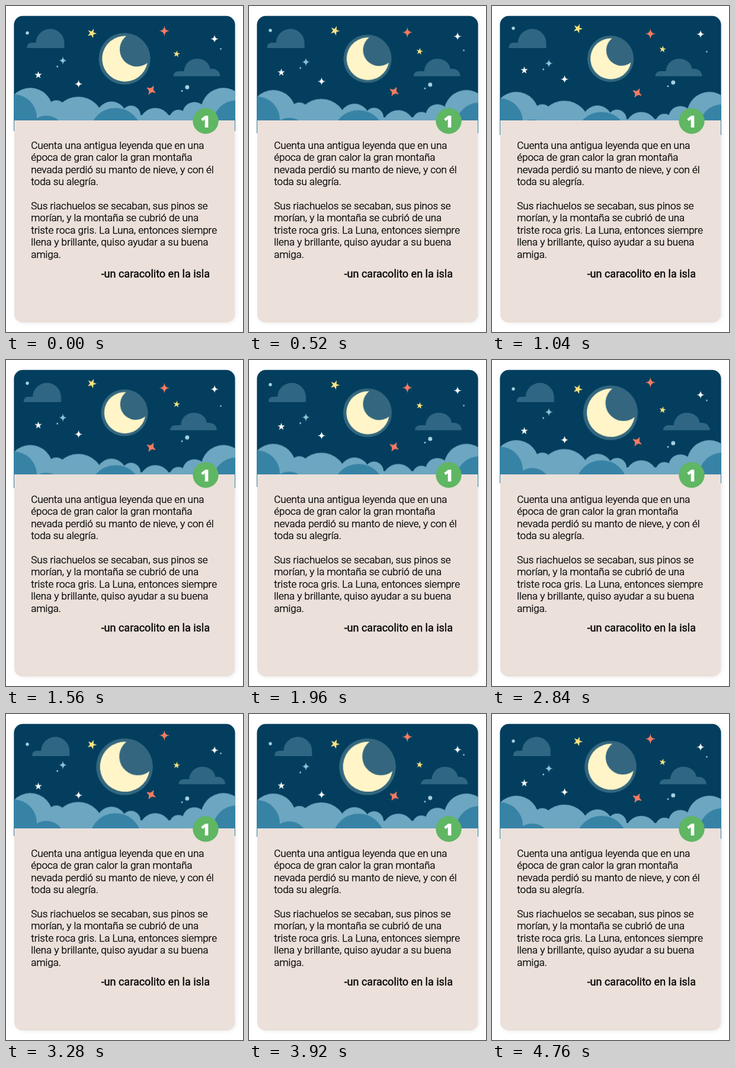
An HTML page for the animation above (4800 ms loop, 400 by 550 pixels).

```html
<!DOCTYPE html>
<html lang="es">
<head>
<meta charset="utf-8">
<title>Cuento de la luna</title>
<style>
  html, body { margin: 0; width: 100%; height: 100%; overflow: hidden; background: #fff; }
  svg { display: block; width: 400px; height: 550px; }
  .card { filter: drop-shadow(2px 1px 3px rgba(0, 0, 0, .08)); }

  .drift { animation: drift 2400ms cubic-bezier(.37, 0, .63, 1) -1300ms infinite alternate; }
  .pulse {
    animation: pulse 2400ms cubic-bezier(.37, 0, .63, 1) -1200ms infinite alternate;
    transform-origin: 200px 89px;
  }
  /* --u sets the size and direction of the bob. */
  .rise, .swell { animation: rise 4800ms linear infinite; }
  .rise { --u: 1px; }
  .swell { --u: -.85px; }
  .dip { animation: dip 4800ms linear infinite; }

  @keyframes drift { from { transform: translateX(8px); } to { transform: translateX(-8px); } }
  @keyframes pulse { from { transform: scale(1.105); } to { transform: scale(.895); } }
  @keyframes rise {
    0%, 100% { transform: translateY(0); }
    12% { transform: translateY(calc(-4.8 * var(--u))); }
    21.7% { transform: translateY(calc(-8 * var(--u))); }
    27% { transform: translateY(calc(-7.9 * var(--u))); }
    40.8% { transform: translateY(calc(-4 * var(--u))); }
    50.8% { transform: translateY(0); }
    60% { transform: translateY(calc(3.6 * var(--u))); }
    68.3% { transform: translateY(calc(5.5 * var(--u))); }
    74% { transform: translateY(calc(5.8 * var(--u))); }
    81.7% { transform: translateY(calc(4.5 * var(--u))); }
    92% { transform: translateY(calc(2 * var(--u))); }
  }
  @keyframes dip {
    0%, 100% { transform: translateY(0); }
    21.7% { transform: translateY(4.8px); }
    31% { transform: translateY(5.4px); }
    40.8% { transform: translateY(4.6px); }
    50.8% { transform: translateY(0); }
    58.3% { transform: translateY(-4px); }
    67% { transform: translateY(-6px); }
    71% { transform: translateY(-5.8px); }
    81.7% { transform: translateY(-3.5px); }
    92% { transform: translateY(-1.2px); }
  }

  .story { font: 300 17px Roboto, sans-serif; stroke: #000; stroke-width: .4px; }
  .sign { font: 400 18px Roboto, sans-serif; stroke: #000; stroke-width: .35px; text-anchor: end; }
  .num { font: 800 29px "Open Sans", sans-serif; text-anchor: middle; fill: #fff; }
</style>
</head>
<body>
<svg viewBox="0 0 400 550">
  <defs>
    <clipPath id="frame"><rect x="13.4" y="16.8" width="373.2" height="517.2" rx="15"/></clipPath>
    <clipPath id="bank"><rect x="13" y="100" width="374" height="111"/></clipPath>
    <path id="spark" d="M0-1Q.05-.05 1 0Q.05.05 0 1Q-.05.05-1 0Q-.05-.05 0-1Z"/>
    <path id="star" d="M0-1 .22-.3 .95-.31 .36.12 .59.81 0 .38-.59.81-.36.12-.95-.31-.22-.3Z"/>
  </defs>

  <rect class="card" x="14" y="17" width="372" height="517" rx="15" fill="#ebe0da"/>

  <g clip-path="url(#frame)">
    <rect x="13" y="16" width="374" height="177" fill="#033e5e"/>

    <g class="drift" fill="#2f6683">
      <path d="M36.5 71v-2a7 7 0 0 1 7-7h8A24 24 0 0 1 99.5 63v8z"/>
      <path d="M283.5 118.5c0-5 4-8.5 9-8.5h9c1-13 10-21 22-21s21 7 22 17h4c8 0 13 6 13 12.5z"/>
    </g>

    <g class="pulse">
      <circle cx="200" cy="89" r="43.6" fill="#34677f"/>
      <path d="M203 50.5A38.5 38.5 0 1 0 238.5 96A27.5 27.5 0 1 1 203 50.5Z" fill="#fff5c8"/>
    </g>

    <g class="rise">
      <use href="#star" transform="translate(145 46) rotate(22) scale(8.3)" fill="#ffe580"/>
      <use href="#star" transform="translate(288 81) rotate(8) scale(6)" fill="#ffe580"/>
      <use href="#star" transform="translate(54.5 116.5) scale(6.5)" fill="#fff"/>
      <use href="#spark" transform="translate(122.5 131.5) scale(7)" fill="#fff"/>
      <use href="#spark" transform="translate(352 55.5) scale(7)" fill="#fff"/>
      <g fill="#a5d1e3">
        <circle cx="36" cy="45.5" r="2.7"/>
        <circle cx="305.8" cy="137" r="3.5"/>
        <circle cx="297" cy="143.3" r="1.4"/>
      </g>
    </g>

    <g class="dip">
      <g fill="#f47c62">
        <use href="#spark" transform="translate(267.3 42) scale(9)"/>
        <use href="#spark" transform="translate(245 142) rotate(30) scale(8)" stroke="#f47c62" stroke-width=".2"/>
      </g>
      <g fill="#8fc3da">
        <use href="#spark" transform="translate(96 92) scale(7)"/>
        <circle cx="86.7" cy="102" r="1.5"/>
        <circle cx="362.5" cy="72.3" r="1.4"/>
      </g>
    </g>

    <g class="swell">
      <g clip-path="url(#bank)">
        <g fill="#6ca6c1">
          <circle cx="41" cy="176" r="38"/>
          <circle cx="85" cy="175" r="16"/>
          <circle cx="122" cy="196" r="43"/>
          <circle cx="178" cy="186" r="25"/>
          <circle cx="211" cy="184" r="16"/>
          <circle cx="252" cy="199" r="27"/>
          <circle cx="291" cy="190" r="15"/>
          <circle cx="318" cy="182" r="20"/>
          <circle cx="367" cy="176" r="38"/>
          <rect x="13" y="184" width="374" height="27"/>
        </g>
        <g fill="#3783a6">
          <circle cx="13" cy="188" r="39"/>
          <circle cx="68" cy="216" r="31"/>
          <circle cx="185" cy="216" r="44"/>
          <circle cx="389" cy="199" r="40"/>
        </g>
      </g>
    </g>

    <rect x="14" y="193" width="372" height="341" fill="#ebe0da"/>
  </g>

  <circle cx="337" cy="194" r="21.7" fill="#5fb663"/>
  <text class="num" x="336.5" y="205">1</text>

  <text class="story">
    <tspan x="42.3" y="241">Cuenta una antigua leyenda que en una</tspan>
    <tspan x="42.3" y="261.4">época de gran calor la gran montaña</tspan>
    <tspan x="42.3" y="281.8">nevada perdió su manto de nieve, y con él</tspan>
    <tspan x="42.3" y="302.2">toda su alegría.</tspan>
    <tspan x="42.3" y="343">Sus riachuelos se secaban, sus pinos se</tspan>
    <tspan x="42.3" y="363.4">morían, y la montaña se cubrió de una</tspan>
    <tspan x="42.3" y="383.8">triste roca gris. La Luna, entonces siempre</tspan>
    <tspan x="42.3" y="404.2">llena y brillante, quiso ayudar a su buena</tspan>
    <tspan x="42.3" y="424.6">amiga.</tspan>
  </text>
  <text class="sign" x="344" y="457.5">-un caracolito en la isla</text>
</svg>
</body>
</html>
```
